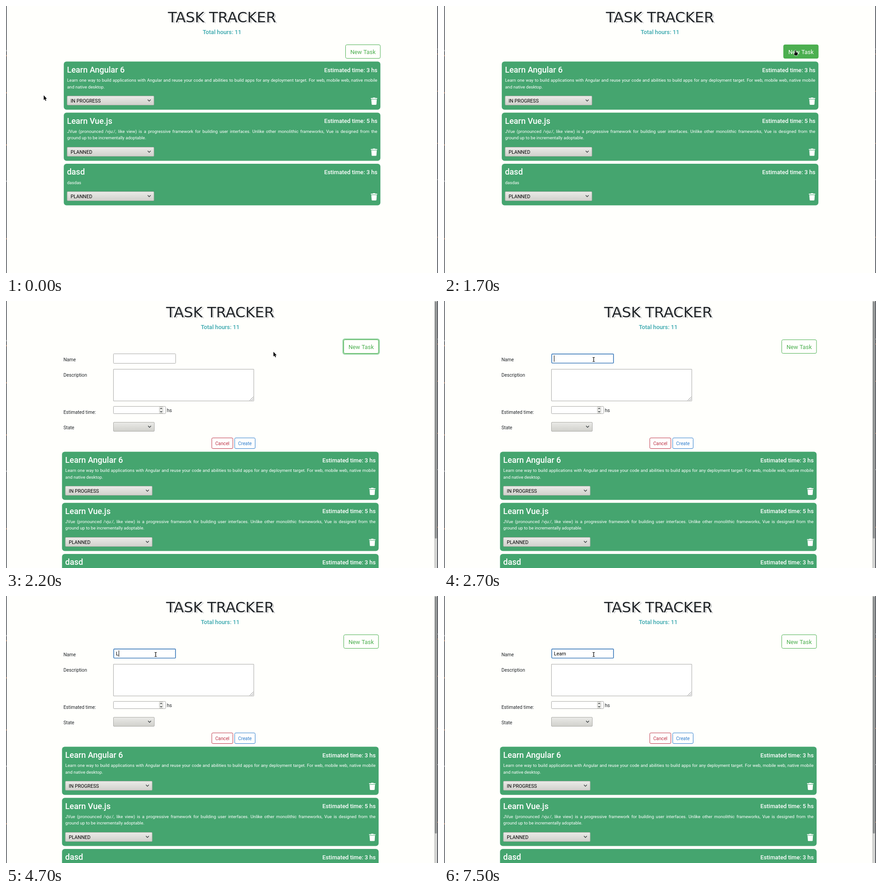
These frames come from a looping animation (951 by 589 pixels, 8000 ms). An HTML page with a canvas:

```html
<!DOCTYPE html>
<html lang="en">
<head>
<meta charset="utf-8">
<title>Task tracker</title>
<style>
  html, body { margin: 0; width: 100%; height: 100%; overflow: hidden; background: #fffffc; }
  canvas { display: block; }
</style>
</head>
<body>
<canvas id="stage" width="951" height="589"></canvas>
<script>
const ctx = document.getElementById('stage').getContext('2d');
const W = 951, H = 589, LOOP = 8000, TICK = 100;
const OPEN_AT = 1900, FOCUS_AT = 2600;
const GREEN = [76, 175, 80], INK = '#212529', PAGE = '#fffffc';

const TASKS = [
  { name: 'Learn Angular 6', hours: 3, state: 'IN PROGRESS', lines: [
    'Learn one way to build applications with Angular and reuse your code and abilities to build apps for any deployment target. For web, mobile web, native mobile',
    'and native desktop.'] },
  { name: 'Learn Vue.js', hours: 5, state: 'PLANNED', lines: [
    'JVue (pronounced /vju:/, like view) is a progressive framework for building user interfaces. Unlike other monolithic frameworks, Vue is designed from the',
    'ground up to be incrementally adoptable.'] },
  { name: 'dasd', hours: 3, state: 'PLANNED', lines: ['dasdas'] }
];

// time, typed text, caret visible
const TYPING = [
  [FOCUS_AT, '', true], [3700, '', false], [4700, 'L', true], [4900, 'Le', true],
  [5700, 'Lead', true], [6100, 'Lea', true], [6200, 'Lear', true],
  [6900, 'Learn', true], [7100, 'Learn ', true], [7500, 'Learn ', false]
];

const clamp = v => Math.max(0, Math.min(1, v));
const lerp = (a, b, p) => a + (b - a) * p;
const easeOut = p => 1 - (1 - p) ** 2;
const easeInOut = p => p * p * (3 - 2 * p);
const mix = (a, b, p) => `rgb(${a.map((v, i) => Math.round(lerp(v, b[i], p)))})`;
const roboto = (size, weight = 400) => `${weight} ${size}px Roboto, sans-serif`;

function text(str, x, y, font, color, align = 'left') {
  ctx.font = font;
  ctx.fillStyle = color;
  ctx.textAlign = align;
  ctx.fillText(str, x, y);
}

function justified(str, x, y, width, font, color) {
  ctx.font = font;
  const words = str.split(' ');
  const widths = words.map(w => ctx.measureText(w).width);
  const gap = (width - widths.reduce((a, b) => a + b)) / (words.length - 1);
  words.forEach((w, i) => {
    text(w, x, y, font, color);
    x += widths[i] + gap;
  });
}

function box(x, y, w, h, r, fill, stroke, line = 1) {
  ctx.beginPath();
  ctx.roundRect(x, y, w, h, r);
  if (fill) { ctx.fillStyle = fill; ctx.fill(); }
  if (stroke) { ctx.strokeStyle = stroke; ctx.lineWidth = line; ctx.stroke(); }
}

function polyline(points, color, width) {
  ctx.beginPath();
  points.forEach(([x, y]) => ctx.lineTo(x, y));
  ctx.strokeStyle = color;
  ctx.lineWidth = width;
  ctx.stroke();
}

function chevron(x, y, half, rise) {
  polyline([[x - half, y - rise], [x, y + rise], [x + half, y - rise]], '#2e3436', 1.3);
}

function select(x, y, w, label) {
  const g = ctx.createLinearGradient(0, y, 0, y + 21);
  g.addColorStop(0, '#ebebe8');
  g.addColorStop(1, '#d0d0cb');
  box(x + 0.5, y + 0.5, w - 1, 20, 1.5, g, '#acaca8');
  chevron(x + w - 11, y + 10.2, 3.2, 1.7);
  text(label, x + 8, y + 14.8, roboto(10.67), '#000');
}

function trash(x, y) {
  ctx.fillStyle = '#fff';
  ctx.beginPath();
  ctx.roundRect(x, y + 1, 14, 2, 0.5);
  ctx.roundRect(x + 4.3, y, 5.4, 1.5, 0.5);
  ctx.fill();
  ctx.beginPath();
  ctx.moveTo(x + 1, y + 4);
  ctx.lineTo(x + 13, y + 4);
  ctx.lineTo(x + 12.3, y + 14.6);
  ctx.quadraticCurveTo(x + 12.2, y + 16, x + 10.8, y + 16);
  ctx.lineTo(x + 3.2, y + 16);
  ctx.quadraticCurveTo(x + 1.8, y + 16, x + 1.7, y + 14.6);
  ctx.fill();
}

function card(task, x, y) {
  const drop = (task.lines.length - 1) * 14.4;
  const h = 91.9 + drop;
  box(x, y, 697, h, 6, '#45a56f');
  text(task.name, x + 7, y + 24.4, roboto(18, 500), '#fff');
  text(`Estimated time: ${task.hours} hs`, x + 690.5, y + 23, roboto(12.8, 500), '#fff', 'right');
  task.lines.forEach((line, i) => {
    const args = [line, x + 7.2, y + 44.6 + i * 14.4];
    if (i < task.lines.length - 1) justified(...args, 683, roboto(9.6), '#fff');
    else text(...args, roboto(9.6), '#fff');
  });
  select(x + 7, Math.round(y + 61 + drop), 192, task.state);
  trash(x + 676, y + 65 + drop);
  return h;
}

function header(cx) {
  const font = '32px "DejaVu Sans", sans-serif';
  [[2.4, '#9a9b9c'], [1.5, PAGE], [0, INK]].forEach(([d, color]) =>
    text('TASK TRACKER', cx + d, 36 + d, font, color, 'center'));
  text('Total hours: 11', cx, 62, roboto(12.8, 500), '#38a7ad', 'center');
}

function newTask(x, hover, focused) {
  if (focused) box(x - 1, 84, 79.5, 33, 4, null, 'rgba(40,167,69,.5)', 2.6);
  box(x + 0.5, 85.5, 76.5, 30, 3, mix([255, 255, 252], GREEN, hover), mix(GREEN, GREEN, 0));
  text('New Task', x + 38.8, 105.5, roboto(12.8), mix(GREEN, [255, 255, 255], hover), 'center');
}

function outlineButton(label, x, w, color) {
  box(x + 0.5, 302, w - 1, 23.5, 2.5, '#fffffe', color);
  text(label, x + w / 2, 317.8, roboto(10.24), color, 'center');
}

function form(t) {
  const label = roboto(10.24), border = '#a9a9a7';
  [['Name', 132.6], ['Description', 167.2], ['Estimated time:', 248.6], ['State', 283.2]]
    .forEach(([s, y]) => text(s, 126.5, y, label, INK));

  if (t < FOCUS_AT) box(236.5, 116.5, 137, 21, 1, '#fff', border);
  else box(237.2, 116.8, 136, 20.2, 1.5, '#fff', '#4480bd', 1.7);
  const [, typed, caret] = TYPING.filter(k => k[0] <= t).pop() || [0, '', false];
  text(typed, 242, 131.4, roboto(10.67), '#000');
  if (caret) {
    const x = Math.round(242 + ctx.measureText(typed).width);
    ctx.fillRect(x, 120, 1, 14);
  }

  box(236.5, 150.5, 309, 70, 0.5, '#fff', border);
  [8, 4].forEach(d => polyline([[544.5 - d, 219.5], [544.5, 219.5 - d]], '#777', 0.9));

  box(236.5, 232.5, 115, 16, 1, '#fff', border);
  box(337.5, 233.5, 8, 14, 1, '#f1f1ee', '#c4c4c0');
  chevron(341.5, 237.3, 2, -1);
  chevron(341.5, 244, 2, 1);
  text('hs', 354, 244.6, roboto(10.67), INK);

  select(236, 267, 91, '');
  outlineButton('Cancel', 452.5, 47.5, '#bd3044');
  outlineButton('Create', 503, 46, '#2b7ccd');
}

function edges(open) {
  ctx.fillStyle = '#20242d';
  ctx.fillRect(0, 0, 1.3, H);
  ctx.fillRect(949.6, 0, 1.4, H);
  const lift = open ? -11 : 0;
  [[97, '#8c919b'], [108, '#b8693f'], [190, '#b8693f'], [305, '#b8693f'], [385, '#8c919b'], [512, '#b8693f']]
    .forEach(([y, color]) => {
      ctx.fillStyle = color;
      ctx.fillRect(0, y + lift, 1, 3);
      ctx.fillRect(950, y + lift - 3, 1, 2);
    });
}

function scrollbar() {
  ctx.fillStyle = '#d2d3d1';
  ctx.fillRect(942.6, 0, 7, H);
  box(944, 1, 4.6, 523, 2, '#8b8e8e');
}

function outlined(path) {
  ctx.strokeStyle = '#fff';
  ctx.lineWidth = 1.4;
  ctx.lineJoin = 'round';
  ctx.stroke(path);
  ctx.fillStyle = '#000';
  ctx.fill(path);
  ctx.lineJoin = 'miter';
}

const ARROW = new Path2D('M0 0V10.4L2.3 8.3L4 12.3L5.6 11.6L4 7.8H7Z');
const HAND = new Path2D('M-1-1Q0-1.8 1-1V3L4.6 3.8Q5.4 4.2 5 6L4.2 10H-1L-3.2 6.4Q-3.2 5-1.8 5.6L-1 6.2Z');

function pointer(x, y, kind) {
  ctx.save();
  ctx.translate(x, y);
  if (kind === 'arrow') outlined(ARROW);
  else if (kind === 'hand') outlined(HAND);
  else {
    polyline([[-2.5, -4.5], [2.5, -4.5]], '#111', 1);
    polyline([[-2.5, 4.5], [2.5, 4.5]], '#111', 1);
    polyline([[0, -4.5], [0, 4.5]], '#111', 1.3);
  }
  ctx.restore();
}

function movePointer(t) {
  if (t < 600) return pointer(83, 197, 'arrow');
  if (t < OPEN_AT) {
    const p = t < 1100 ? 0 : easeOut(clamp((t - 1000) / 700));
    const x = lerp(85, 773.5, p), y = lerp(196, 99, p);
    return pointer(x, y, x > 747 ? 'hand' : 'arrow');
  }
  const p = easeInOut(clamp((t - OPEN_AT) / 700));
  const x = lerp(757, 329.5, p), y = lerp(101, 129, p);
  pointer(x, y, x < 374 ? 'text' : 'arrow');
}

function draw(t) {
  const open = t >= OPEN_AT;
  ctx.fillStyle = PAGE;
  ctx.fillRect(0, 0, W, H);
  header(open ? 471.5 : 475.5);
  const hover = open ? clamp(1 - (t - 1950) / 150) : clamp((t - 1550) / 150);
  newTask(open ? 743 : 747, hover, open && t < FOCUS_AT);
  if (open) form(t);
  let y = open ? 332.5 : 122.5;
  for (const task of TASKS) y += card(task, open ? 123.3 : 127.2, y) + 6.4;
  if (open) scrollbar();
  edges(open);
  movePointer(t);
}

const start = performance.now();
function frame() {
  const t = (performance.now() - start) % LOOP;
  draw(Math.floor(t / TICK) * TICK);
  requestAnimationFrame(frame);
}
frame();
</script>
</body>
</html>
```
